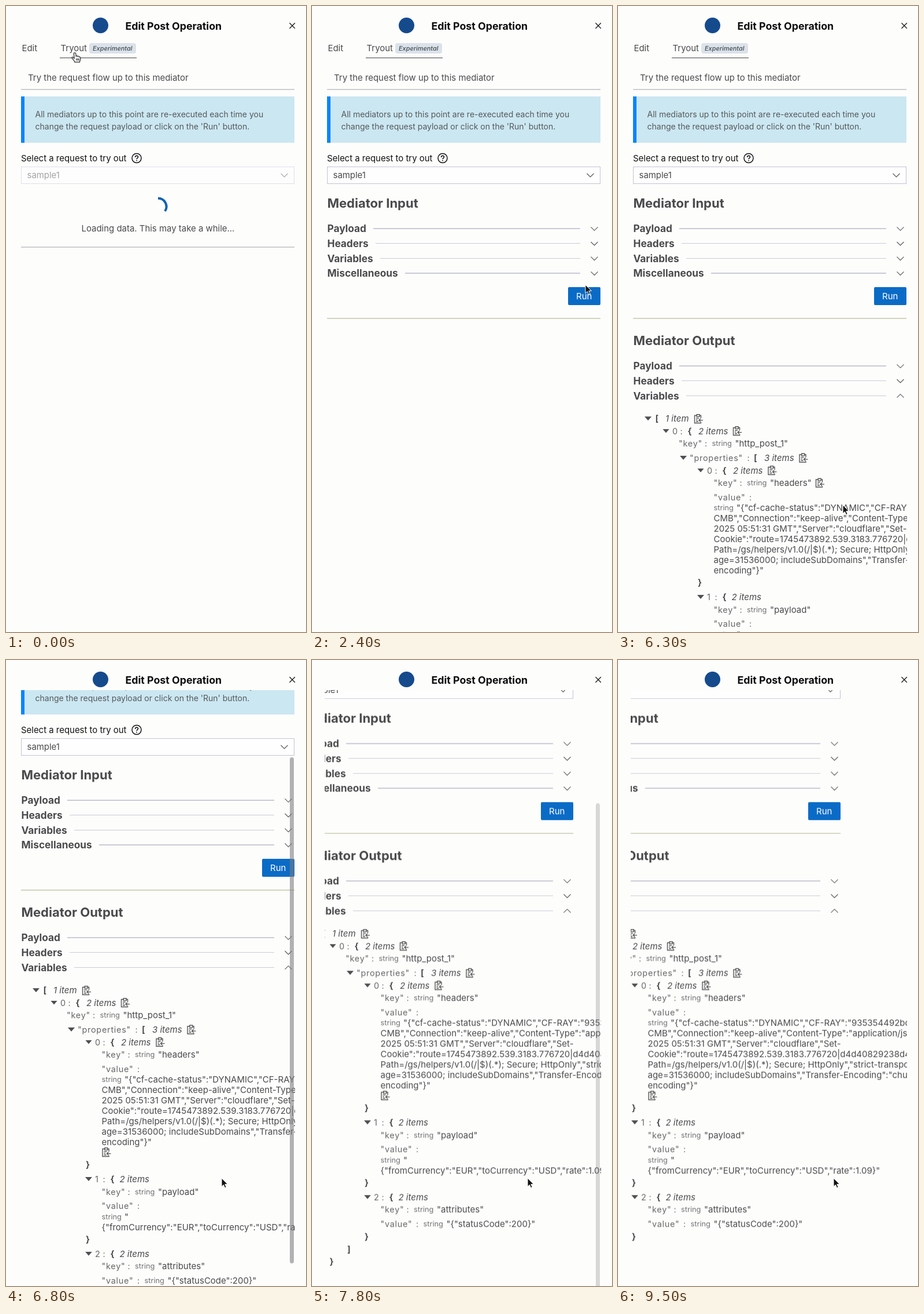
An HTML page that plays this animation: 519x1080 px, repeating every 9.6 s.

```html
<!DOCTYPE html>
<html lang="en">
<head>
<meta charset="utf-8">
<title>Edit Post Operation</title>
<style>
html, body { margin: 0; width: 100%; height: 100%; overflow: hidden; background: #fdfdfc; }
body { position: relative; font: 14.95px/20px Inter, Roboto, sans-serif; color: #4a4a4c; }
body *, svg { position: absolute; }
svg { overflow: visible; left: 0; top: 0; width: 1px; height: 1px; }
svg * { position: static; }
.t { white-space: pre; }
#view { left: 22px; top: 52px; width: 478px; height: 1028px; overflow: hidden; }
#page { left: -22px; top: -52px; width: 519px; height: 1400px; }
.g { left: 0; top: 0; }
.title { font-size: 17.8px; font-weight: 700; color: #0c0c0c; }
.h2 { font-size: 22px; font-weight: 700; }
.h3 { font-size: 17.25px; font-weight: 700; }
.dark { color: #111; }
.note { font-size: 14px; color: #55595c; }
.tag { font-size: 10.9px; font-style: italic; font-weight: 500; color: #444a52; }
.key { font-size: 14.4px; letter-spacing: .75px; color: #666; }
.val { font-size: 15px; }
.type { font-size: 12.8px; color: #707072; }
.it { font-style: italic; font-size: 15px; }
.br { font-weight: 700; }
.tri { width: 12px; height: 7px; background: #505052; clip-path: polygon(0 0, 100% 0, 50% 100%); }
.rule { height: 1.6px; background: #cbcad6; }
.btn { border-radius: 2px; background: #0a6bc6; }
.white { color: #fff; font-size: 15px; }
.line { fill: none; stroke: #555; stroke-width: 1.1; }
#bar { left: 491px; top: 52px; width: 7px; height: 873px; border-radius: 4px; background: rgba(125,125,130,.58); }
#arc { animation: spin 1s steps(10) infinite; }
@keyframes spin { to { transform: rotate(360deg); } }
</style>
</head>
<body>
<div id="view">
  <div id="page">
    <div class="g" id="top"></div>
    <div class="g" id="wait">
      <svg><g transform="translate(263 346)"><path id="arc" d="M0-14.3A14.3 14.3 0 0 1 12 8" fill="none" stroke="#0f62b4" stroke-width="4"/></g></svg>
    </div>
    <div class="g" id="input"></div>
    <div class="g" id="output"></div>
    <div class="g" id="misc"></div>
    <div class="g" id="tree"></div>
    <div class="g" id="tail"></div>
    <div class="g" id="icons"></div>
    <div class="g" id="keyIcon"></div>
    <div class="g" id="valIcon"></div>
  </div>
</div>
<div id="bar"></div>
<div class="g" id="head"></div>
<svg id="cursor">
  <path id="arrow" d="M0 0V14.6L3.4 11.4 5.7 16.7 8.1 15.6 5.8 10.4H10.4Z" fill="#111" stroke="#fff"/>
  <path id="hand" d="M-1.7 1.6C-1.6-.5 1.5-.5 1.7 1.6L2.2 6.2C3 5 4.6 5.3 4.9 6.6 5.8 5.8 7.2 6.2 7.5 7.4 8.6 6.9 9.7 7.6 9.7 9.2V11.5C9.7 13 8.6 14 8.4 16.3H0C-.6 14-3.6 11.2-4.9 9.2-5.6 8-4.2 7-3 8L-.9 9.8ZM2.8 10V13.6M5 10V13.6M7 10V13.6" fill="#fff" stroke="#222" stroke-width="1.2"/>
</svg>
<script>
const LOOP = 9600;
const $ = id => document.getElementById(id);
const esc = s => s.replace(/&/g, '&amp;').replace(/</g, '&lt;');
const add = (id, html) => $(id).insertAdjacentHTML('beforeend', html);

// y is the middle of the capitals
const text = (id, x, y, s, cls = '') =>
  add(id, `<div class="t ${cls}" style="left:${x}px;top:${y - 10}px">${esc(s)}</div>`);
const box = (id, x, y, w, h, css = '', cls = '') =>
  add(id, `<div class="${cls}" style="left:${x}px;top:${y}px;width:${w}px;height:${h}px;${css}"></div>`);
const rule = (id, x, y, x2, css) => box(id, x, y - .8, x2 - x, 1.6, css, 'rule');
const path = (id, x, y, d, css = '') =>
  add(id, `<svg><path class="line" style="${css}" transform="translate(${x} ${y})" d="${d}"/></svg>`);
const chevron = (id, x, y, up) => path(id, x, y, up ? 'M-6 3L0-3 6 3' : 'M-6-3L0 3 6-3');
const tri = (id, x, y) => add(id, `<div class="tri" style="left:${x - 6}px;top:${y - 4}px"></div>`);
const clip = (id, x, y) => path(id, x, y,
  'M4.5-1V-5.5H2.2V-7.3H-2.8V-5.5H-6.5V7.5H4.5V6M-2.8-5.5V-3.6H2.2V-5.5M-4-1H1M-4 2H-1.5M-4 4.8H0M8 2.6H1M4 -.2L1 2.6 4 5.4',
  'stroke-width:1.4');

// Header
box('head', 0, 0, 519, 52, 'background:#fdfdfc');
box('head', 149.5, 19.5, 27, 27, 'border-radius:50%;background:#154a8d');
text('head', 206.5, 34.5, 'Edit Post Operation', 'title');
path('head', 495.2, 34, 'M-4.7-4.7L4.7 4.7M4.7-4.7L-4.7 4.7', 'stroke:#222;stroke-width:1.4');

// Tabs, note and request picker
text('top', 27.5, 73, 'Edit');
text('top', 94.5, 73, 'Tryout');
box('top', 144, 64, 80.5, 17.5, 'border-radius:4px;background:#dbe2ea');
text('top', 150, 72.5, 'Experimental', 'tag');
box('top', 93, 89, 132.5, 1.2, 'background:#444');
text('top', 38, 124, 'Try the request flow up to this mediator');
rule('top', 26, 144.2, 499, 'background:#cfcfd2');
box('top', 26, 156, 473, 79.5, 'background:#cbe7f1');
box('top', 26, 156, 5.5, 79.5, 'background:#0a85fb');
text('top', 50.5, 186.5, 'All mediators up to this point are re-executed each time you', 'note');
text('top', 50.5, 207.5, "change the request payload or click on the 'Run' button.", 'note');
text('top', 26, 262.5, 'Select a request to try out', 'dark');
path('top', 226, 262.5, 'M8 0A8 8 0 1 1-8 0A8 8 0 1 1 8 0M-2.4-1.6C-2.4-5 2.5-5 2.5-1.9C2.5-.2 0-.1 0 1.8M0 3.3V4.9', 'stroke:#111;stroke-width:1.5');
add('top', '<div class="g" id="pick"></div>');
box('pick', 26, 276.5, 471, 28.5, 'border:1px solid #c3c2d6;background:#fefefe');
text('pick', 36.5, 292.3, 'sample1');
chevron('pick', 481.5, 292);

// Loading
text('wait', 130.5, 384, 'Loading data. This may take a while...');
rule('wait', 26, 415.8, 499, 'background:#cfcfcf');

// Collapsible sections
const names = [['Payload', 106], ['Headers', 110], ['Variables', 118], ['Miscellaneous', 161]];
function section(id, y, title) {
  text(id, 26.5, y, title, 'h2');
  names.forEach(([name, x], i) => {
    const row = y + 44.3 + 25.7 * i, out = id === 'output';
    const to = out && i === 3 ? 'misc' : id;
    text(to, 26.5, row, name, 'h3');
    rule(to, x, row - .4, 463.5);
    if (out && i === 2) {
      add(id, '<div class="g" id="shut"></div><div class="g" id="open"></div>');
      chevron('shut', 488.5, row);
      chevron('open', 488.5, row, true);
    } else chevron(to, 488.5, row);
  });
}
section('input', 340, 'Mediator Input');
section('output', 577, 'Mediator Output');
box('input', 443, 485, 56, 31, '', 'btn');
box('input', 443, 485, 56, 31, 'background:#07549a', 'btn');
$('input').lastElementChild.id = 'hover';
text('input', 457, 500.7, 'Run', 'white');
rule('input', 26, 539.2, 499, 'background:#d3d4be');

// JSON tree
function node(id, x, y, label, brace, items, colonX, braceX, itemX) {
  tri(id, x - 11, y);
  if (label) text(id, x, y, label, 'key');
  if (colonX) text(id, colonX, y, ':', 'key');
  text(id, braceX, y, brace, 'br');
  text(id, itemX, y, items, 'it');
}
const entry = (id, x, y, i) => node(id, x, y, String(i), '{', '2 items', x + 13.5, x + 26.5, x + (i ? 42.5 : 45));
function leaf(id, x, y, key, val) {
  const gap = key === 'key' ? 0 : 16.5;
  text(id, x, y, `"${key}"`, 'key');
  text(id, x + 45 + gap, y, ':', 'key');
  if (!val) return;
  text(id, x + 57.5 + gap, y, 'string', 'type');
  text(id, x + 97.5 + gap, y, `"${val}"`, 'val');
}
node('tree', 63, 712.3, '', '[', '1 item', 0, 64.5, 82);
entry('tree', 94, 733.5, 0);
leaf('tree', 105, 755.3, 'key', 'http_post_1');
node('tree', 124, 780, '"properties"', '[', '3 items', 223.5, 235, 253);
entry('tree', 154, 801.5, 0);
leaf('tree', 165.5, 823.3, 'key', 'headers');
leaf('tree', 165.5, 848, 'value');
text('tree', 165.5, 866.3, 'string', 'type');
[
  '"{"cf-cache-status":"DYNAMIC","CF-RAY":"935354492bc',
  'CMB","Connection":"keep-alive","Content-Type":"application/json',
  '2025 05:51:31 GMT","Server":"cloudflare","Set-',
  'Cookie":"route=1745473892.539.3183.776720|d4d40829238d4',
  'Path=/gs/helpers/v1.0(/|$)(.*); Secure; HttpOnly","strict-transport-',
  'age=31536000; includeSubDomains","Transfer-Encoding":"chunked',
  'encoding"}"'
].forEach((s, i) => text('tree', i ? 165.5 : 205, 866.3 + 17.9 * i, s, 'val'));

text('tail', 138, 1013, '}', 'br');
entry('tail', 154, 1038, 1);
leaf('tail', 165.5, 1059.7, 'key', 'payload');
leaf('tail', 165.5, 1084.3, 'value');
text('tail', 165.5, 1102.8, 'string', 'type');
text('tail', 205, 1102.8, '"', 'val');
text('tail', 165.5, 1120.6, '{"fromCurrency":"EUR","toCurrency":"USD","rate":1.09}"', 'val');
text('tail', 138, 1142, '}', 'br');
entry('tail', 154, 1166.8, 2);
leaf('tail', 165.5, 1188.3, 'key', 'attributes');
leaf('tail', 165.5, 1213.3, 'value', '{"statusCode":200}');
text('tail', 138, 1235, '}', 'br');
text('tail', 108, 1256.5, ']', 'br');
text('tail', 77.5, 1278, '}', 'br');
text('tail', 62.5, 1299.5, ']', 'br');

[[139, 712], [206, 733], [320.5, 779.5], [266.5, 801]].forEach(p => clip('icons', ...p));
clip('keyIcon', 349, 822.5);
clip('valIcon', 173.5, 991);

// Timeline: moves advance once every 100 ms
function track(id, prop, points, show = v => v) {
  const last = points[points.length - 1];
  const keys = [...points, [LOOP, last[1]]].map(([t, v], i, all) => ({
    offset: t / LOOP,
    [prop]: show(v),
    easing: i < all.length - 1 ? `steps(${Math.max(1, Math.round((all[i + 1][0] - t) / 100))})` : 'linear'
  }));
  $(id).animate(keys, { duration: LOOP, iterations: Infinity });
}
const px = ([x, y]) => `${x}px ${y}px`;
// Visible only within the given spans
function during(id, ...spans) {
  const keys = [[0, 0]];
  spans.forEach(([a, b]) => {
    if (a) keys.push([a, 1]); else keys[0][1] = 1;
    if (b < LOOP) keys.push([b, 0]);
  });
  keys.push([LOOP, keys[keys.length - 1][1]]);
  $(id).animate(keys.map(([t, v]) => ({ offset: t / LOOP, opacity: v, easing: 'step-end' })),
    { duration: LOOP, iterations: Infinity });
}

const READY = 700, RAN = 4300, OPEN = 5500, HOVER = 6100, MOVE = 6400;
during('wait', [0, READY]);
during('input', [READY, LOOP]);
during('output', [RAN, LOOP]);
during('misc', [RAN, OPEN]);
during('shut', [0, OPEN]);
during('open', [OPEN, LOOP]);
during('tree', [OPEN, LOOP]);
during('tail', [OPEN, LOOP]);
during('icons', [HOVER, LOOP]);
during('keyIcon', [HOVER, MOVE]);
during('valIcon', [MOVE, LOOP]);
during('hover', [2500, 5000]);
during('hand', [0, 1100], [2500, 5000], [5200, 5700]);
during('arrow', [1100, 2500], [5000, 5200], [5700, LOOP]);
track('pick', 'opacity', [[0, .5], [READY - 100, .5], [READY, 1]]);
track('tail', 'translate', [[0, [0, -18]], [MOVE - 100, [0, -18]], [MOVE, [0, 0]]], px);

track('cursor', 'translate', [
  [0, [119, 80.5]], [1000, [119, 80.5]], [1300, [200, 180]], [1700, [420, 430]], [2000, [473, 481]],
  [2400, [473, 481]], [2600, [475.5, 505]], [4800, [475.5, 505]], [5300, [488, 669]], [5600, [488, 669]],
  [6100, [405, 840]], [6300, [389, 861]], [6600, [373, 894]]
], px);

const down = [[6300, 0], [6400, 10], [6500, 36], [6600, 70], [6700, 107], [6800, 142], [7000, 195], [7200, 228], [7400, 239.8]];
const side = [[7500, 0], [7600, 10], [7700, 27], [7800, 47], [8000, 79], [8300, 104], [8600, 114]];
track('page', 'translate', [
  [0, [0, 0]],
  ...down.map(([t, y]) => [t, [0, -y]]),
  ...side.map(([t, x]) => [t, [-x, -239.8]])
], px);
track('bar', 'translate', [[0, 0], ...down], y => `0px ${y * .815}px`);
track('bar', 'opacity', [[0, 0], [6300, 0], [6500, 1], [7600, 1], [8000, 0]]);
</script>
</body>
</html>
```
